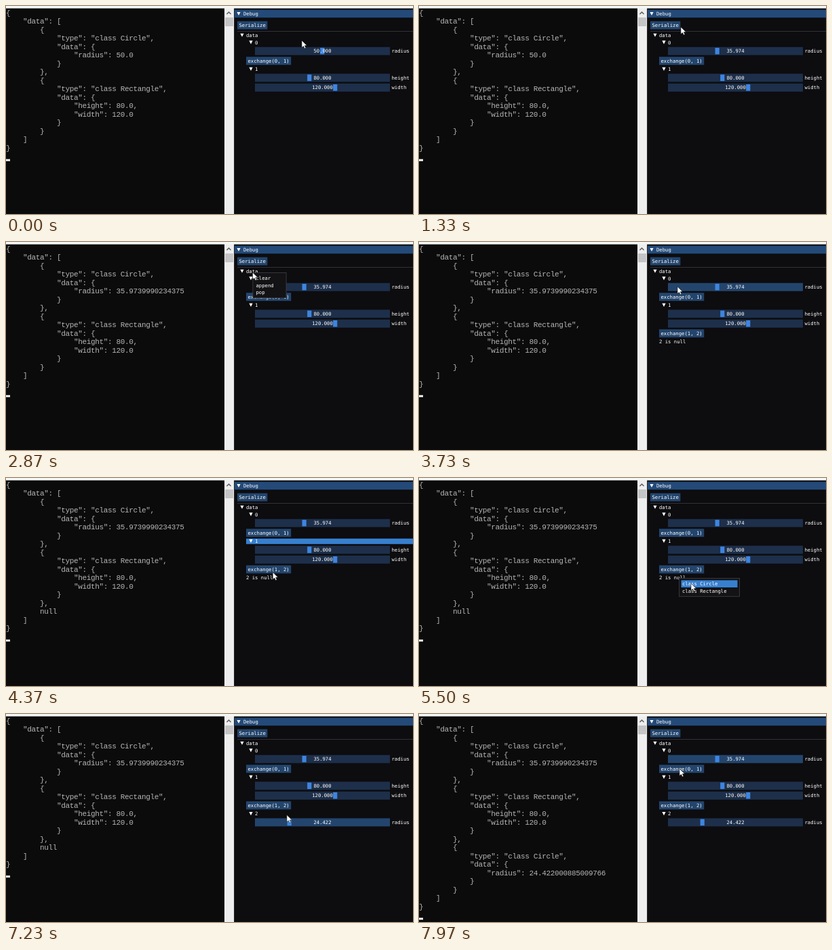
Animation of 600x308 px, one loop 8 s. Source, as an HTML page with a canvas:

```html
<!DOCTYPE html>
<html lang="en">
<head>
<meta charset="utf-8">
<title>Serialize demo</title>
<style>
html, body { margin: 0; width: 100%; height: 100%; overflow: hidden; background: #0c0b0c; }
canvas { display: block; }
</style>
</head>
<body>
<canvas id="stage" width="600" height="308"></canvas>
<script>
const ctx = document.getElementById('stage').getContext('2d');
const LOOP = 8000, TRIP = 300, REST = 150, HOVER_LAG = 60;
const TEXT_H = 8.1, FRAME_H = 12, GAP = 2.5, CHAR_W = 4.375, LINE_H = 12.5;
const LEFT = 341, INDENT = 13, RIGHT = 600;
const SLIDER = { x: 367, w: 199, zero: 371.4, travel: 189.7 };
const COLOR = {
  back: '#0c0b0c', panel: '#0d0c0f', title: '#234a79', frame: '#1d2f4a', hover: '#23456d',
  active: '#3168ab', grab: '#3d85e0', bright: '#4296fa', header: '#3780d0', popup: '#131214', border: '#414148'
};
const RADIUS_A = 35.974, RADIUS_B = 24.422;
const knob = (value, max = 100) => SLIDER.zero + SLIDER.travel * value / max;

// The pointer reaches each step at its time, after a short trip, and clicks REST ms later.
const step = (at, x, y, trip = TRIP) => ({ at, x, y, trip, click: at + REST });
const saveAt = at => step(at, 380, 27);
const steps = {
  enter: step(-TRIP, 470, 40),
  start: step(0, 436, 51),
  grabA: step(350, 436, 67),
  dropA: step(850, knob(RADIUS_A), 67),
  save1: saveAt(1360),
  menu: step(2550, 363.5, 45),
  append: step(3230, 381, 66),
  save2: saveAt(4050),
  look: step(4370, 394, 139, TRIP / 2),
  classes: step(4650, 383, 148),
  pick: step(5430, 401, 156),
  expand: step(6050, 361, 148),
  grabB: step(6520, 414, 163),
  dropB: step(7000, knob(RADIUS_B), 163),
  save3: saveAt(7500),
  end: step(7970, 384, 81)
};
const after = (name, t) => t >= steps[name].click;
const between = (first, last, t) => after(first, t) && !after(last, t);

function pointerAt(t) {
  let { x, y } = steps.enter;
  for (const s of Object.values(steps)) {
    const k = Math.min(1, Math.max(0, (t - s.at) / s.trip + 1));
    x += (s.x - x) * k;
    y += (s.y - y) * k;
  }
  return { x, y };
}

function box(x, y, w, h, color) {
  ctx.fillStyle = color;
  ctx.fillRect(x, y, w, h);
}
function shape(points, color) {
  ctx.beginPath();
  points.forEach(([x, y]) => ctx.lineTo(x, y));
  ctx.closePath();
  ctx.fillStyle = color;
  ctx.fill();
}
function triangle(x, y, open = true) {
  const r = 2.6;
  shape(open ? [[x - r, y - r], [x + r, y - r], [x, y + r]] : [[x - r, y - r], [x + r, y], [x - r, y + r]], '#fff');
}
function label(text, x, y, align = 'left') {
  ctx.font = '7.27px "DejaVu Sans Mono", monospace';
  ctx.letterSpacing = '0px';
  ctx.textAlign = align;
  ctx.fillStyle = '#fff';
  ctx.fillText(text, x, y + 0.5);
}

// Console
function objectLines(name, fields) {
  return ['        {', `            "type": "class ${name}",`, '            "data": {',
    ...fields.map(f => ' '.repeat(16) + f), '            }', '        }'];
}
function consoleLines(t) {
  const radius = after('save1', t) ? '35.9739990234375' : '50.0';
  const items = [
    objectLines('Circle', [`"radius": ${radius}`]),
    objectLines('Rectangle', ['"height": 80.0,', '"width": 120.0'])
  ];
  if (after('save3', t)) items.push(objectLines('Circle', ['"radius": 24.422000885009766']));
  else if (after('save2', t)) items.push(['        null']);
  items.slice(0, -1).forEach(lines => lines[lines.length - 1] += ',');
  return ['{', '    "data": [', ...items.flat(), '    ]', '}'];
}
function drawConsole(t) {
  const lines = consoleLines(t);
  ctx.font = '11px "Liberation Mono", monospace';
  ctx.letterSpacing = '-0.35px';
  ctx.textAlign = 'left';
  ctx.fillStyle = '#b6b6b6';
  lines.forEach((line, i) => ctx.fillText(line, 0, 11 + i * LINE_H));
  box(0, 14.2 + lines.length * LINE_H, 6, 3, '#f2f2f2');

  box(322, 0, 14, 308, '#eeeeee');
  box(323, 17, 12, 13, '#c4c4c6');
  ctx.beginPath();
  ctx.moveTo(325.5, 12);
  ctx.lineTo(328.5, 9);
  ctx.lineTo(331.5, 12);
  ctx.strokeStyle = '#555';
  ctx.lineWidth = 1.3;
  ctx.stroke();
}

// Debug panel: widgets flow downwards, each row taking its height plus a gap
function drawPanel(t) {
  const menu = between('menu', 'append', t), classes = between('classes', 'pick', t);
  const dragA = between('grabA', 'dropA', t), dragB = between('grabB', 'dropB', t);
  const mouse = pointerAt(t), past = pointerAt(t - HOVER_LAG);
  const inside = (x, y, w, h) => past.x >= x && past.x < x + w && past.y >= y && past.y < y + h;
  const hovered = (...area) => !menu && !classes && !dragA && !dragB && inside(...area);

  let top;
  function row(height) {
    const y = top;
    top += height + GAP;
    return y;
  }
  function button(text, level) {
    const area = [LEFT + level * INDENT, row(FRAME_H), text.length * CHAR_W + 5, FRAME_H];
    box(...area, hovered(...area) ? COLOR.bright : COLOR.hover);
    label(text, area[0] + 2.5, area[1] + FRAME_H / 2);
  }
  function node(text, level, open = true) {
    const x = LEFT + level * INDENT, y = row(TEXT_H), area = [x, y, RIGHT - x, TEXT_H];
    if (hovered(...area)) box(...area, COLOR.header);
    triangle(x + 7, y + TEXT_H / 2 - 0.3, open);
    label(text, x + INDENT, y + TEXT_H / 2);
  }
  function slider(name, value, max = 100, active = false) {
    const { x, w } = SLIDER, y = row(FRAME_H);
    box(x, y, w, FRAME_H, active ? COLOR.active : hovered(x, y, w, FRAME_H) ? COLOR.hover : COLOR.frame);
    box(knob(value, max) - 3.1, y + 1.2, 6.2, FRAME_H - 2.4, active ? COLOR.bright : COLOR.grab);
    label(value.toFixed(3), x + w / 2, y + FRAME_H / 2, 'center');
    label(name, x + w + GAP, y + FRAME_H / 2);
  }
  function popup(items, { x, y }, w) {
    const pitch = TEXT_H + GAP, h = items.length * pitch + 6.5;
    box(x, y, w, h, COLOR.border);
    box(x + 0.8, y + 0.8, w - 1.6, h - 1.6, COLOR.popup);
    items.forEach((text, i) => {
      const area = [x + 3.5, y + 3.4 + i * pitch, w - 7, pitch];
      if (inside(...area)) box(...area, COLOR.header);
      label(text, x + 5, area[1] + pitch / 2);
    });
  }
  const dragged = (mouse.x - SLIDER.zero) / SLIDER.travel * 100;

  box(336, 0, 264, 308, COLOR.panel);
  box(336, 0, 1, 308, '#29292c');
  box(337, 5.6, 263, 11.6, COLOR.title);
  triangle(343, 11.5);
  label('Debug', 350, 11.5);

  top = 22.5;
  button('Serialize', 0);
  box(LEFT, top, RIGHT - LEFT, 0.7, COLOR.border);
  top += GAP;
  node('data', 0);
  node('0', 1);
  slider('radius', dragA ? dragged : after('dropA', t) ? RADIUS_A : 50, 100, dragA);
  button('exchange(0, 1)', 1);
  node('1', 1);
  slider('height', 80, 200);
  slider('width', 120, 200);
  if (after('append', t)) {
    button('exchange(1, 2)', 1);
    if (after('pick', t)) node('2', 1, after('expand', t));
    else label('2 is null', LEFT + INDENT, top + TEXT_H / 2);
  }
  if (after('expand', t)) slider('radius', dragB ? dragged : after('dropB', t) ? RADIUS_B : 0, 100, dragB);

  if (menu) popup(['clear', 'append', 'pop'], steps.menu, 50);
  if (classes) popup(['class Circle', 'class Rectangle'], steps.classes, 90);
  drawPointer(mouse);
}
function drawPointer({ x, y }) {
  const arrow = [[0, 0], [0, 10.6], [2.5, 8.4], [4.2, 12], [6, 11.2], [4.4, 7.7], [7.6, 7.5]];
  shape(arrow.map(([dx, dy]) => [x + dx, y + dy]), '#fff');
  ctx.strokeStyle = '#111';
  ctx.lineWidth = 0.6;
  ctx.stroke();
}

function draw(now) {
  const t = now % LOOP;
  ctx.textBaseline = 'middle';
  box(0, 0, 600, 308, COLOR.back);
  drawConsole(t);
  drawPanel(t);
  box(0, 0, 600, 3.5, '#f4f7f4');
}

let start;
function tick(now) {
  start ??= now;
  draw(now - start);
  requestAnimationFrame(tick);
}
draw(0);
requestAnimationFrame(tick);
</script>
</body>
</html>
```
